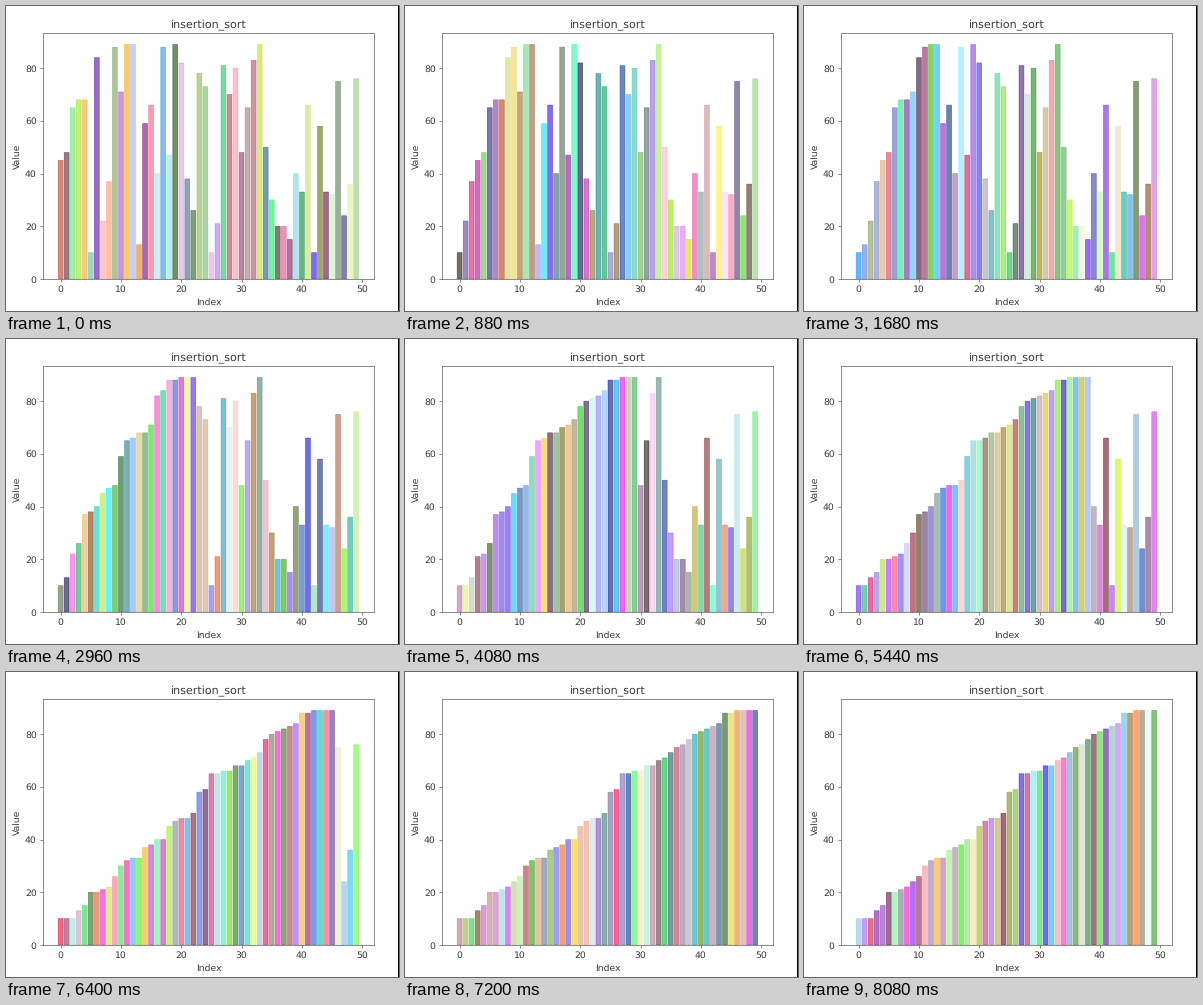
Animation, 393 px wide and 305 px high, one loop 8.16 s. Source, as a matplotlib script:

```python
import matplotlib.pyplot as plt
import numpy as np
from matplotlib.animation import FuncAnimation

W, H, DPI = 393, 305, 66.6
FRAMES, INTERVAL = 102, 80
COUNT = 50
START, RATE = 2.15, 0.54  # insertions done at first, and per frame
INK, LINE = "#3a3a3a", "#666666"

rng = np.random.RandomState(0)
values = rng.randint(1, 100, COUNT)
colors = rng.rand(FRAMES, COUNT, 3)

plt.rcParams.update({
    "font.family": "DejaVu Sans",
    "text.hinting": "none",
    "text.color": INK,
    "axes.labelcolor": INK,
    "xtick.labelcolor": INK,
    "ytick.labelcolor": INK,
    "axes.edgecolor": LINE,
    "xtick.color": LINE,
    "ytick.color": LINE,
})


def insertion_state(frame):
    """Values once the elements reached by this frame are inserted."""
    done = min(int(START + RATE * frame) + 1, COUNT)
    return np.concatenate([np.sort(values[:done]), values[done:]])


# The small excess keeps the pixel size from being truncated.
fig = plt.figure(figsize=((W + 0.01) / DPI, (H + 0.01) / DPI), dpi=DPI,
                 facecolor="white")
ax = fig.add_axes([37.2 / W, 32 / H, 330.4 / W, 246.2 / H])
bars = ax.bar(range(COUNT), values, alpha=0.6, linewidth=0.72, snap=False)
ax.set_title("insertion_sort")
ax.set_xlabel("Index")
ax.set_ylabel("Value")

# Dark rule along the right edge
fig.add_artist(plt.Rectangle((1 - 1 / W, 0), 1 / W, 1, fc="black", lw=0,
                             transform=fig.transFigure, antialiased=False))


def update(frame):
    for bar, height, color in zip(bars, insertion_state(frame), colors[frame]):
        bar.set_height(height)
        bar.set_color(color)
    return list(bars)


anim = FuncAnimation(fig, update, frames=FRAMES, interval=INTERVAL,
                     repeat=True, repeat_delay=0, blit=False)
plt.show()
```
